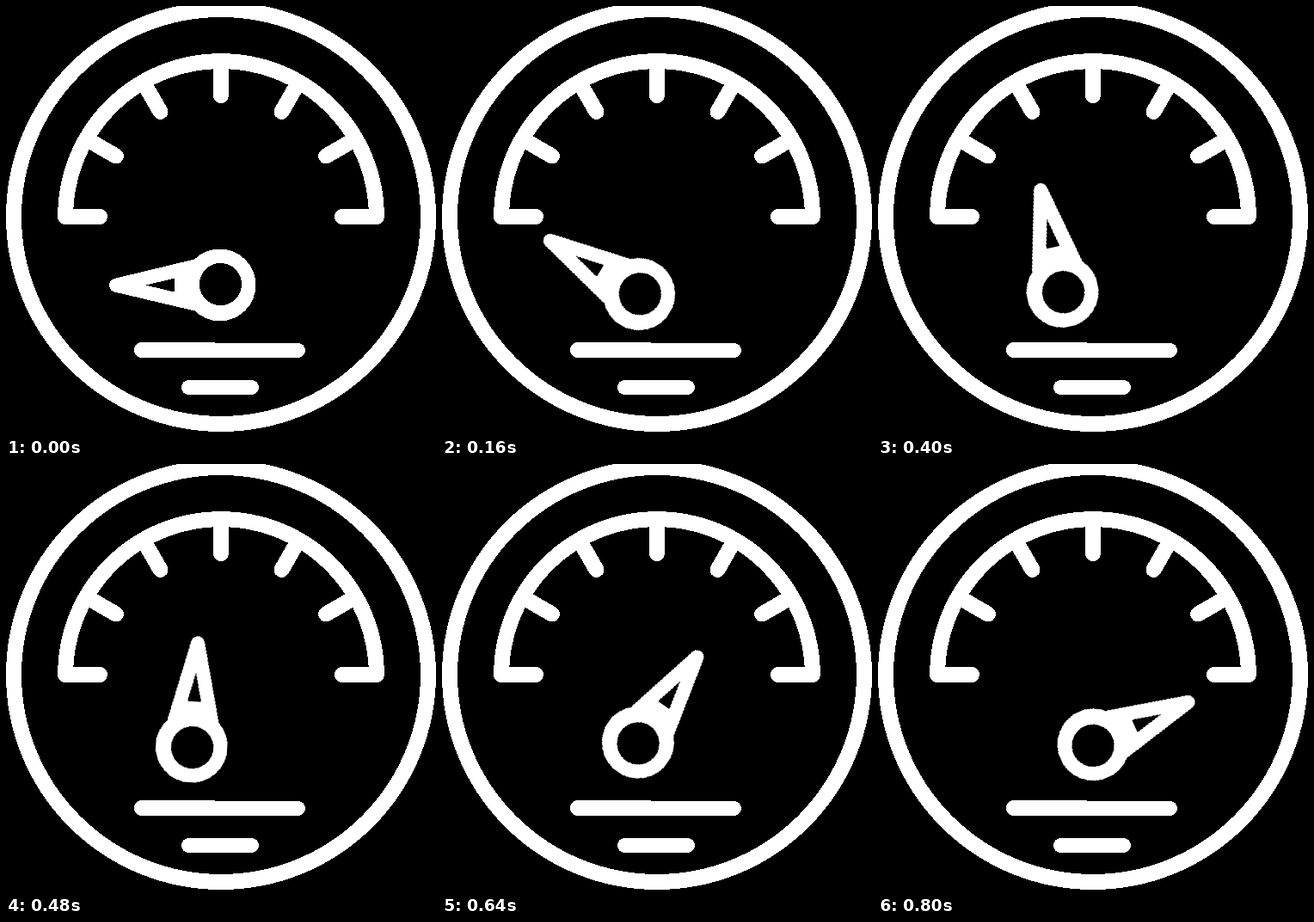
Recreate the animation shown at these times as an HTML page. Size 500 by 500 pixels, loop 2000 ms.

```html
<!DOCTYPE html>
<html lang="en">
<head>
<meta charset="utf-8">
<title>Gauge</title>
<style>
  html, body { margin: 0; width: 100%; height: 100%; overflow: hidden; background: #000; }
  svg { display: block; width: 100vw; height: 100vh; shape-rendering: crispEdges; }
  .line { fill: none; stroke: #fff; stroke-width: 18; stroke-linecap: round; stroke-linejoin: round; }
  .mid { stroke-width: 17; }
  .thin { stroke-width: 16; }
  #needle { transform-origin: 249.5px 279.5px; }
</style>
</head>
<body>
<svg viewBox="0 0 500 500">
  <circle class="line" cx="250" cy="245" r="241"/>
  <path class="line" d="M69 245A181 181 0 0 1 431 245"/>
  <g id="ticks"></g>
  <path class="line" d="M158 400H240"/>
  <path class="line mid" d="M241 400.5H339.5M212.5 443.5H285.5"/>
  <g id="needle">
    <path class="line thin" d="M218 303L128 324.7L218 346M204 308V341"/>
    <circle cx="248.6" cy="324.4" r="41.9" fill="#fff"/>
    <circle cx="249.4" cy="323.6" r="24.6"/>
  </g>
</svg>
<script>
  const ticks = document.getElementById('ticks');
  for (let angle = -90; angle <= 90; angle += 30) {
    const tick = document.createElementNS('http://www.w3.org/2000/svg', 'path');
    tick.setAttribute('class', 'line');
    tick.setAttribute('d', 'M250 64V104');
    tick.setAttribute('transform', `rotate(${angle} 250 245)`);
    ticks.append(tick);
  }

  // The needle turns about a pivot that drifts in a straight line, then rests.
  const start = 'translate(0px, 0px) rotate(0deg)';
  const end = 'translate(18.4px, 88.2px) rotate(156deg)';
  document.getElementById('needle').animate([
    { transform: start, offset: 0, easing: 'steps(40, end)' },
    { transform: end, offset: 0.4 },
    { transform: end, offset: 1 }
  ], { duration: 2000, iterations: Infinity });
</script>
</body>
</html>
```
